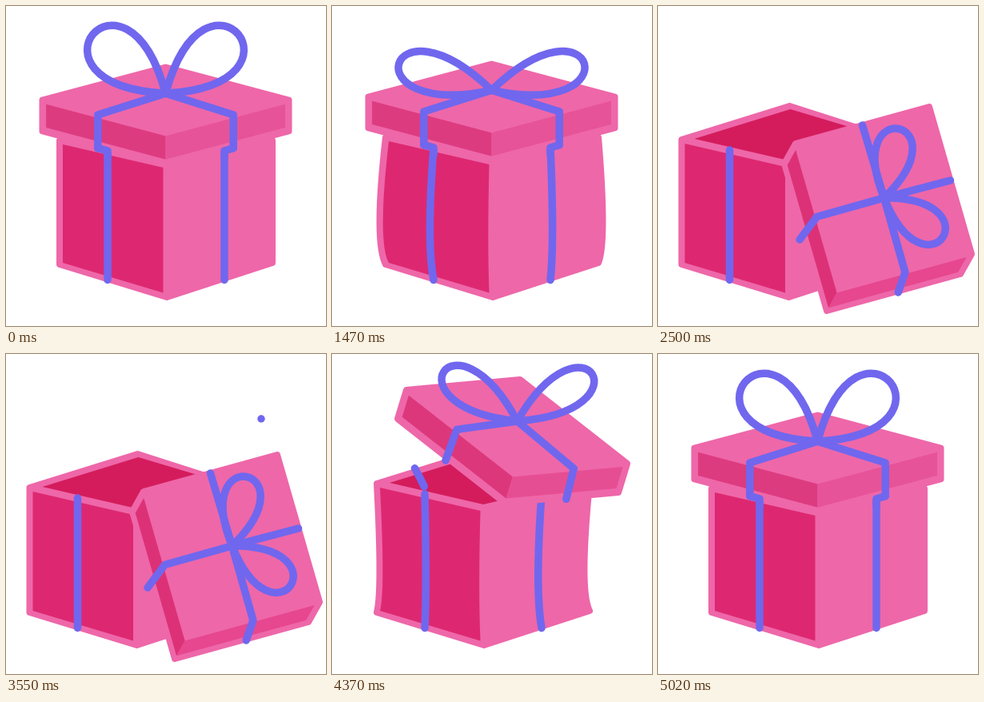
An HTML page with a canvas for the animation above (5.05 s loop, 400 px wide and 400 px high).

```html
<!DOCTYPE html>
<html lang="en">
<head>
<meta charset="utf-8">
<title>Gift box</title>
<style>
html, body { margin: 0; height: 100%; overflow: hidden; background: #fff; }
canvas { display: block; width: 100vmin; height: 100vmin; }
</style>
</head>
<body>
<canvas id="stage" width="400" height="400"></canvas>
<script>
const ctx = document.getElementById('stage').getContext('2d');
const PINK = '#ee67a9', FACE = '#dd2871', INSIDE = '#d41c5c', RIBBON = '#7067ee';
const LOOP = 5050, OPEN_AT = 1020, CLOSE_AT = 3550, LAST = 60;

// The lid is a slab: its top has corners at center ± across ± depth, its rim hangs along drop.
const closed = {
  center: [199.5, 117.5], across: [77, 20.5], depth: [77, -20.5], drop: [0, 39],
  tilt: [.2],                 // perspective offset of the strap crossing
  reach: [0],                 // how much of the rear straps shows
  bow: [-90, 51, 36, 193],    // axis, loop angle from axis, loop spread (degrees), size
  box: [0, 0],                // sideways shift, rim height
  bulge: [0, 0]               // outward bend of the uprights, common sway
};
const raised = (dy, changes) =>
  ({ ...closed, center: [closed.center[0], closed.center[1] + dy], box: [0, dy], ...changes });
const squashed = raised(12, { bulge: [22, -2] });
const springing = raised(-4, { bulge: [13, -2], bow: [-90, 74, 28, 182] });
const lifted = {
  center: [231, 91], across: [67, 52.5], depth: [71, -6.5], drop: [-11, 36],
  tilt: [.12], reach: [0], bow: [-89, 57, 28, 167], box: [-11, -6], bulge: [-10, -3]
};
const landing = {
  center: [279, 210.5], across: [31, 87], depth: [79, -22.5], drop: [-14, 29],
  tilt: [.02], reach: [1], bow: [-53.5, 49.5, 33, 157], box: [-35.5, 1], bulge: [0, 0]
};
const open = {
  center: [282, 241], across: [26.5, 92], depth: [83.5, -23], drop: [-14, 25],
  tilt: [.01], reach: [1], bow: [-22, 56, 34, 142], box: [-37.5, -1], bulge: [0, 0]
};
const keys = [[0, closed], [9, squashed], [19, springing], [26, lifted], [34, landing], [46, open]];
const times = keys.map(([time]) => time);

// Monotone cubic interpolation: smooth, without overshoot.
function spline(values, u) {
  const n = times.length - 1;
  if (u >= times[n]) return values[n];
  const i = times.findIndex(t => t > u) - 1;
  const delta = k => (values[k + 1] - values[k]) / (times[k + 1] - times[k]);
  const slope = k => {
    if (k === 0 || k === n) return 0;
    const a = delta(k - 1), b = delta(k);
    return a * b <= 0 ? 0 : 2 * a * b / (a + b);
  };
  const w = times[i + 1] - times[i], t = (u - times[i]) / w, s = 1 - t;
  return values[i] * s * s * (1 + 2 * t) + values[i + 1] * t * t * (3 - 2 * t)
    + w * t * s * (slope(i) * s - slope(i + 1) * t);
}

function poseAt(u) {
  const pose = {};
  for (const part in closed)
    pose[part] = closed[part].map((_, i) => spline(keys.map(([, key]) => key[part][i]), u));
  return pose;
}

const mix = (a, b, t) => a + (b - a) * t;
const easeOut = (u, from, to) => 1 - (1 - Math.max(0, Math.min(1, (u - from) / (to - from)))) ** 2;

function trace(points, close) {
  ctx.beginPath();
  for (const [x, y] of points) ctx.lineTo(x, y);
  if (close) ctx.closePath();
}
function fill(points, color) {
  trace(points, true);
  ctx.fillStyle = color;
  ctx.fill();
}
function stroke(color = RIBBON, width = 9.5) {
  ctx.strokeStyle = color;
  ctx.lineWidth = width;
  ctx.stroke();
}
function line(...points) {
  trace(points);
  stroke();
}

function drawBox({ box: [shift, h], bulge: [bulge, sway] }) {
  const upright = (x, y) =>
    ctx.quadraticCurveTo(x + bulge * (x - 200) / 133 + sway, 295, x, y);
  ctx.save();
  ctx.translate(shift, 0);

  trace([[67, 168 + h], [202, 126 + h], [333, 168 + h]]);
  upright(333, 321);
  ctx.lineTo(201, 364);
  ctx.lineTo(67, 323);
  upright(67, 168 + h);
  ctx.closePath();
  ctx.fillStyle = PINK;
  ctx.fill();
  stroke(PINK, 8);

  fill([[83, 167 + h], [203, 130 + h], [323, 166 + h], [200, 194 + h]], INSIDE);

  trace([[71, 173 + h], [196.5, 202 + h]]);
  upright(196.5, 358.5);
  ctx.lineTo(71, 321);
  upright(71, 173 + h);
  ctx.fillStyle = FACE;
  ctx.fill();

  for (const x of [127, 273]) {
    trace([[x, 181 + h]]);
    upright(x, 342.5);
    stroke();
  }
  ctx.restore();
}

function drawBow([x, y], [axis, apart, spread, size]) {
  for (const side of [-1, 1]) {
    const handle = turn => {
      const angle = (axis + side * (apart + turn)) * Math.PI / 180;
      return [x + size * Math.cos(angle), y + size * Math.sin(angle)];
    };
    ctx.beginPath();
    ctx.moveTo(x, y);
    ctx.bezierCurveTo(...handle(-spread), ...handle(spread), x, y);
    stroke();
  }
}

function drawLid({ center, across, depth, drop, tilt: [tilt], reach: [reach], bow, box: [, h] }, joined) {
  const at = (a, b, d = 0) =>
    [0, 1].map(i => center[i] + a * across[i] + b * depth[i] + d * drop[i]);

  fill([at(-1, -1), at(-1, 1), at(1, 1), at(1, 1, 1), at(1, -1, 1), at(-1, -1, 1)], PINK);
  stroke(PINK, 8);
  fill([at(-.94, -1, .1), at(1, -1, .1), at(1, -1, .85), at(-.94, -1, .85)],
    `rgb(221, ${48 + 55 * tilt}, ${118 + 50 * tilt})`);
  fill([at(1, -1, .1), at(1, .94, .1), at(1, .94, .85), at(1, -1, .85)],
    `rgb(230, ${70 + 65 * tilt}, ${143 + 45 * tilt})`);

  const cross = at(-tilt, tilt), half = tilt / 2, splay = (.2 - tilt) * .4;
  const leftEnd = at(-half, -1 - splay, 1.07), rightEnd = at(1, half + splay, 1.07);
  line(leftEnd, at(-half, -1), cross, at(1, half), rightEnd);
  line(at(mix(-tilt, -1, reach), mix(tilt, 0, reach)), cross,
    at(mix(-tilt, 0, reach), mix(tilt, 1, reach)));
  if (joined) {
    line(leftEnd, [127, 181 + h], [127, 190 + h]);
    line(rightEnd, [273, 181 + h], [273, 190 + h]);
  }
  drawBow(cross, bow);
}

// Point on a chain of cubic curves; t counts whole curves.
function curvePoint(path, t) {
  const k = Math.min(Math.floor(t), (path.length - 1) / 3 - 1), f = t - k, g = 1 - f;
  const [a, b, c, d] = path.slice(3 * k, 3 * k + 4);
  return [0, 1].map(i =>
    a[i] * g ** 3 + 3 * b[i] * g * g * f + 3 * c[i] * g * f * f + d[i] * f ** 3);
}
function drawTrail(path, tail, head) {
  line(...Array.from({ length: 31 }, (_, i) => curvePoint(path, mix(tail, head, i / 30))));
}

const streak = [[125, 190], [108, 140], [70, 85], [7, 27]];
const streamer = [[147, 186], [145, 140], [148, 95], [163, 65], [195, 2], [290, -6], [319, 81]];

function drawConfetti(u) {
  if (u > 24 && u < 48) drawTrail(streak, easeOut(u, 24, 48), easeOut(u, 24, 36));
  if (u > 29 && u < LAST) drawTrail(streamer, 2 * easeOut(u, 34, 59), 2 * easeOut(u, 29, 46));
  if (u > 27 && u < 48) {
    const rise = easeOut(u, 27, 42);
    const radius = 13.5 * easeOut(u, 27, 33) * (1 - easeOut(u, 36, 48));
    ctx.beginPath();
    ctx.arc(mix(137, 88, rise), mix(140, 20, rise), radius, 0, 7);
    stroke(RIBBON, Math.min(9.5, radius));
  }
}

// Opens, rests, then plays the same steps backwards.
function stepAt(t) {
  const steps = (from, to, count) => Math.floor((t - from) / (to - from) * count + .15);
  const u = t < CLOSE_AT ? steps(OPEN_AT, 2500, LAST - 1) + 1 : LAST - 1 - steps(CLOSE_AT, 5020, LAST - 1);
  return Math.max(0, Math.min(LAST, u));
}

const start = performance.now();
function draw() {
  const u = stepAt((performance.now() - start) % LOOP), pose = poseAt(u);
  ctx.fillStyle = '#fff';
  ctx.fillRect(0, 0, 400, 400);
  ctx.lineJoin = ctx.lineCap = 'round';
  drawBox(pose);
  drawConfetti(u);
  drawLid(pose, u < 21);
  requestAnimationFrame(draw);
}
draw();
</script>
</body>
</html>
```
